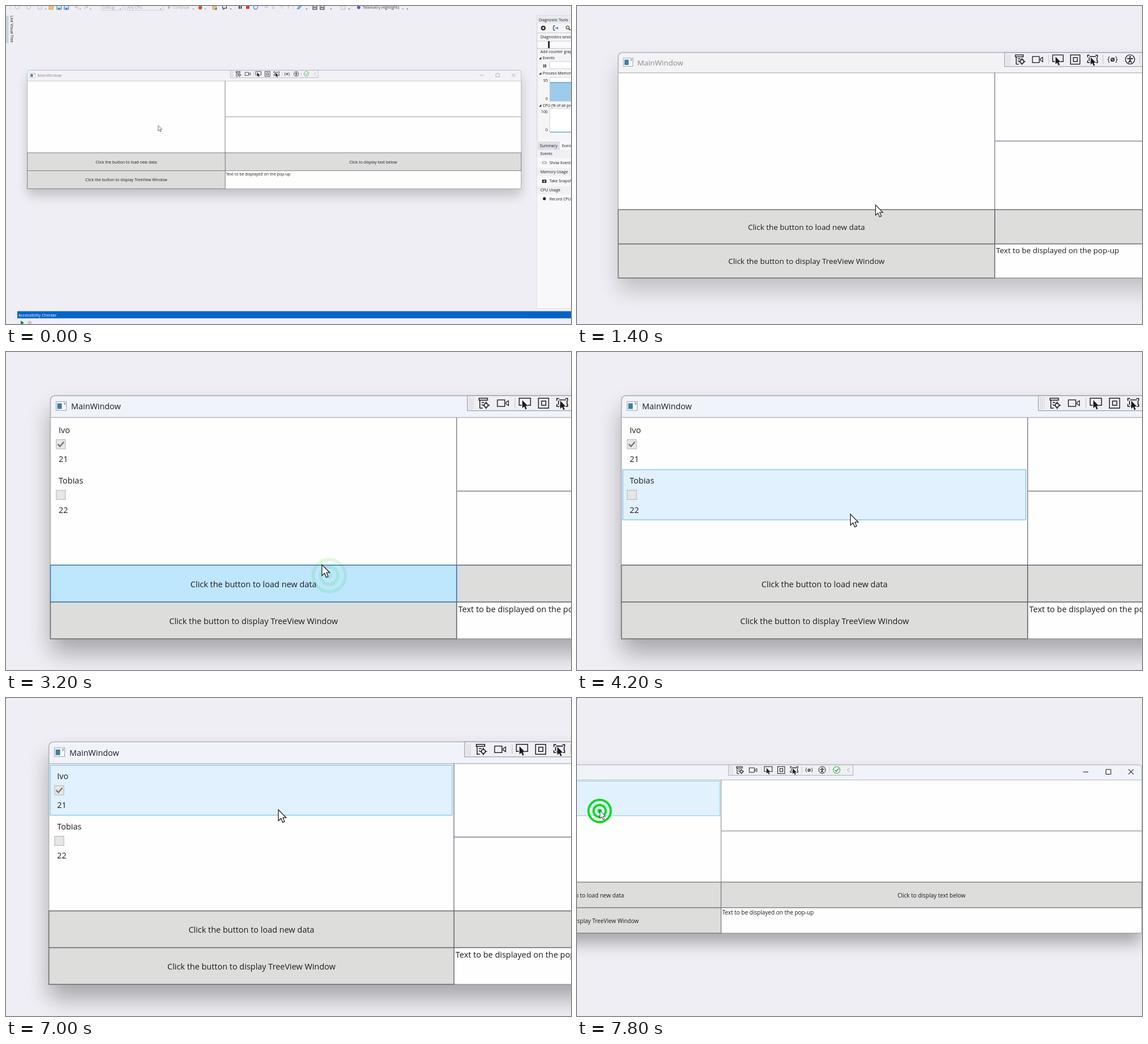
Write an HTML page that moves like this. It is 998 px wide and 561 px high and loops after 8000 ms.

```html
<!DOCTYPE html>
<html lang="en">
<head>
<meta charset="utf-8">
<title>MainWindow demo</title>
<style>
html, body { margin: 0; width: 100%; height: 100%; overflow: hidden; background: #eeeef4; }
svg { display: block; width: 100vw; height: 100vh; font-family: "Open Sans", "Noto Sans", sans-serif; }
text { white-space: pre; }
</style>
</head>
<body>
<svg id="stage" viewBox="0 0 998 561"></svg>
<script>
const LOOP = 8000, STEP = 200, WIDE = 0.4868;
const INK = '#1c1c1e', EDGE = '#707074';

// --- markup helpers ---
const rect = (x, y, w, h, fill = 'none', stroke = 'none', sw = 1, more = '') =>
  `<rect x="${x}" y="${y}" width="${w}" height="${h}" fill="${fill}" stroke="${stroke}" stroke-width="${sw}" ${more}/>`;
const path = (d, stroke = INK, sw = 1.3, fill = 'none', more = '') =>
  `<path d="${d}" stroke="${stroke}" stroke-width="${sw}" fill="${fill}" ${more}/>`;
const disc = (x, y, r, fill = 'none', stroke = 'none', sw = 1) =>
  `<circle cx="${x}" cy="${y}" r="${r}" fill="${fill}" stroke="${stroke}" stroke-width="${sw}"/>`;
const text = (x, y, str, size = 14.5, fill = INK, more = '') =>
  `<text x="${x}" y="${y}" font-size="${size}" fill="${fill}" ${more}>${str}</text>`;
const mid = 'text-anchor="middle"';

// --- development environment around the window, in wide-view pixels ---
function topBar() {
  const gray = '#b9b9c0', blue = '#3f7fbf', gold = '#c99a3a';
  const label = (x, s, c = '#a4a4ac') => text(x, 5.2, s, 6.8, c);
  const drop = x => path(`M${x - 1.5} 4.5h3l-1.5 2z`, 'none', 0, '#55555c');
  let s = '';
  for (const x of [8, 405, 507, 611]) s += path(`M${x} 0v7`, '#b5b5bd', 1, 'none', 'stroke-dasharray="1 1.5"');
  for (const x of [20, 40]) s += disc(x, 2, 3.5, 'none', gray);
  s += rect(57, -2, 6, 8, 'none', gray) + path('M76 0h3l1 1h4l-1 5h-7z', gold, 1, '#e8c987');
  for (const x of [90, 103]) s += rect(x, -1, 7.5, 7, '#dce8f4', blue, 1.2) + rect(x + 2, 3, 3.5, 3, blue);
  s += path('M122 2h5q3 1 0 4M124 0l-2 2l2 2M145 2h-5q-3 1 0 4M143 0l2 2l-2 2', gray, 1);
  for (const x of [70, 131, 149, 202, 273, 331, 352, 701]) s += drop(x).replace('#55555c', '#8f8f98');
  s += rect(168, -4, 39, 11.5, 'none', '#cfcfd6') + label(171, 'Debug');
  s += rect(211, -4, 67, 11.5, 'none', '#cfcfd6') + label(214, 'Any CPU');
  s += path('M286 -1v7l5-3.5z', 'none', 0, gray) + label(295, 'Continue');
  s += disc(343, 3, 3.4, '#d65a4b') + path('M346 0l-3 4', '#555', 1);
  s += path('M365 0h3l1 1h3v5h-7z', gold, 1, '#e8c987') + disc(371, 5, 1.8, blue);
  s += rect(382.5, -1, 7, 5, 'none', INK) + path('M383 6.5l3-2', blue, 1.5);
  for (const x of [397, 531, 574, 606, 709]) s += drop(x);
  s += rect(411, -1, 1.8, 6, INK) + rect(414.5, -1, 1.8, 6, INK) + rect(424, -1, 6, 6, '#d83b2e');
  s += disc(441, 2, 3.6, 'none', blue, 1.2);
  s += path('M456 2h6l-2-2m2 2l-2 2M472 -1v6l-2-2m2 2l2-2M484 0q4 0 4 5M499 5v-6l-2 2m2-2l2 2', gray, 1);
  s += path('M514 5l4-5h4l-4 5z', blue, 1, '#9dc0e4');
  for (const x of [542, 555]) s += rect(x, -1, 7, 7, 'none', INK, 1) + path(`M${x + 2} 4v-3l3 3v-3`, INK, 0.8);
  s += rect(592, 0, 7, 6, 'none', gray);
  return s + disc(623, 2.5, 3, '#7d4fb3') + label(630, 'Telemetry Highlights', '#3b3b42');
}

function sidePanel() {
  const line = '#d0d0d8', t = (x, y, s) => text(x, y, s, 6.9);
  const head = (y, s) => path(`M945.5 ${y}v-4l-4 4z`, 'none', 0, INK) + t(948, y + .5, s);
  let s = rect(938, 17, 300, 516, '#f5f5f8', '#ccccd6') + rect(938, 17, 300, 14, '#e9e9f0');
  s += t(941, 26.7, 'Diagnostic Tools');
  s += disc(949, 39, 2.6, 'none', INK, 1.6) + disc(949, 39, 4, 'none', INK, .8);
  s += path('M970 35h-3v8h3', INK, 1) + path('M969 39h6l-2-2m2 2l-2 2', '#2f6fb5', 1.1);
  s += disc(992, 38, 2.8, 'none', INK, 1) + path('M994 40l3 3', INK, 1.2);
  s += path('M938 47.5h300M938 75.5h300', line) + t(944, 57.2, 'Diagnostics session');
  s += rect(938, 62, 300, 13, '#fafafc', line) + rect(957.5, 62, 2.8, 12.5, INK);
  s += t(944, 83.3, 'Add counter graph');
  s += head(94, 'Events') + rect(949.5, 103, 1.5, 5.5, INK) + rect(952.5, 103, 1.5, 5.5, INK);
  s += rect(960.5, 98, 200, 12.5, '#fff', line);
  s += head(121, 'Process Memory') + rect(960.5, 126, 200, 42, '#fff', line) + rect(961, 135, 200, 33, '#9dcbe9');
  s += path('M961 135h200', '#4d9ccb') + t(949, 134, '95') + t(953, 166.5, '0');
  s += head(177.5, 'CPU (% of all processors)') + rect(960.5, 181, 200, 42, '#fff', line);
  s += path('M961 222.5h200', '#5aa5d2') + t(945, 189, '100') + t(953, 221.5, '0');
  s += rect(938, 238, 300, 295, '#f8f8fa') + rect(939, 239, 39, 15, '#dedee6');
  s += t(943, 249.4, 'Summary') + t(982, 249.4, 'Events');
  for (const [y, name] of [[254, 'Events'], [286, 'Memory Usage'], [318, 'CPU Usage']])
    s += rect(938, y, 300, 14, '#efeff4') + t(944, y + 9.5, name);
  s += rect(947.5, 275, 7, 3, 'none', '#777', .8) + t(960, 279.5, 'Show Events');
  s += rect(947, 306.5, 7.5, 5.5, INK) + disc(950.7, 309.2, 1.5, '#ddd') + t(960, 311.5, 'Take Snapshot');
  return s + disc(951, 340, 2.6, INK) + t(960, 343, 'Record CPU');
}

const environment = () => topBar() + sidePanel()
  + rect(0, 17, 4.5, 48.5, '#cbd2df')
  + text(0, 0, 'Live Visual Tree', 6.7, INK, 'transform="translate(7.8 17) rotate(90)"')
  + rect(20, 538.5, 1000, 12.5, '#0064c8') + text(22, 547.6, 'Accessibility Checker', 7.05, '#fff')
  + path('M26 555v8l6-4z', 'none', 0, '#1f8a2f') + rect(39, 556, 6, 6, '#c6c6cc');

// --- application window, in close-up pixels ---
const arrow = 'M0 0V19.5L4.6 15.4L7.7 22.6L11 21.2L8 14.2H13.8Z';

function toolStrip() {
  let s = rect(815, 77, 318, 26.5, '#f0f0f4', '#a2a2ac', 1.3);
  for (let i = 0; i < 3; i++)
    s += path(`M${819 + i * 3} ${i % 2 ? 82 : 80.5}v20`, '#a9a9b2', 1.2, 'none', 'stroke-dasharray="1.2 1.8"');
  for (const x of [899, 1002.5, 1072.5]) s += path(`M${x} 81v18`, '#c6c6cf', 1.2);
  s += rect(835.5, 81.5, 15, 3.5, 'none', INK, 1.5) + path('M837 85v14h5M840 89h5M840 93h2', INK, 1.5);
  s += disc(848, 94, 3.6, 'none', INK, 1.6) + path('M848 87.5v4M848 96.5v4M841.5 94h4M850.5 94h4', INK, 1.6);
  s += rect(868, 84.5, 13, 11.5, 'none', INK, 1.4) + path('M883 89l4.5-3v8.500l-4.500-3z', INK, 1.3);
  const pointer = (x, y) => path(arrow, 'none', 0, INK, `transform="translate(${x} ${y}) scale(.72)"`);
  s += path('M911 94h-4.500v-12.500h20v12.500h-5', INK, 1.5) + pointer(912, 85);
  s += rect(940.500, 81.5, 18, 17.500, 'none', INK, 1.5) + rect(946, 86.500, 7.500, 7.500, 'none', INK, 1.5);
  s += path('M977 84.500h12M976 86v7M991 86v7M978 95h3M973 86v-4h4M988 82h4v4M973 92v4h4M992 92v4h-3', INK, 1.6) + pointer(979, 86);
  s += text(1020.7, 94.500, '{   }', 13, INK, mid) + disc(1020.7, 90.5, 3, 'none', INK, 1.6) + path('M1018 93.500l6-6.500', INK, 1.3);
  s += disc(1054, 90, 8.800, 'none', INK, 1.4) + disc(1054, 85.500, 1.6, INK);
  s += path('M1048.500 88.500h11M1054 88v4M1054 91.500l-3 5M1054 91.500l3 5', INK, 1.7);
  s += disc(1091, 90, 8.500, '#f2faf2', '#399a4b', 1.5) + path('M1086.500 90l3.500 3.500l6-7', '#2f8f41', 2);
  return s + path('M1124 85l-5.500 5l5.500 5', '#a3a3ac', 1.4);
}

const button = (id, x, y, w, label) =>
  rect(x, y, w, 65, '#dddddc', EDGE, 1.6, `id="${id}"`) + text(x + w / 2, y + 38.6, label, 14.5, INK, mid);

const person = (y, name, age, on) => text(93, y + 24.5, name) + text(93, y + 76, age)
  + rect(88.7, y + 36.5, 16.3, 16.3, '#e6e6e6', '#bdbdbd', 1.2)
  + (on ? path(`M91.500 ${y + 44.500}l3.800 4l7-8`, '#6f6f6f', 2.2) : '');

const hoverRow = (id, y) => rect(80.8, y, 712, 88.5, '#e1f1fd', '#7cc3e8', 1.3, `id="${id}"`);

function appWindow() {
  const [L, D, R] = [78.5, 796, 1870];
  let s = rect(L, 101, R - L, 430, '#000', 'none', 0, 'id="shadow" rx="10" filter="url(#soft)"');
  s += rect(L, 77, R - L, 429, '#f3f3f6', '#a9a9af', 1.4, 'id="frame" rx="8"');
  s += rect(88.5, 87.500, 18, 15.500, '#fdfdfd', '#a5a9b0', 1.2) + rect(90.500, 90.500, 8, 10, '#3d7f9e') + rect(102, 89.500, 3, 3, '#8fa3b5');
  s += text(115, 101.3, 'MainWindow', 14.4, INK, 'id="title"');
  s += `<g id="controls" fill="none" stroke-width="1.5"><path d="M1720 95h13.5M1836 88l13 13M1849 88l-13 13"/><rect x="1778.500" y="88.500" width="12.500" height="12.500" rx="1"/></g>`;
  s += rect(L, 115.5, D - L, 260.5, '#fefefe', '#abadb3', 1.3);
  s += rect(D, 115.5, R - D, 130, '#fefefe', '#abadb3', 1.3) + rect(D, 245.5, R - D, 130.5, '#fefefe', '#abadb3', 1.3);
  s += path(`M${D} 115.500V376M${D} 245.500H${R}`, '#a0a0aa', 2);
  s += `<g id="list">${hoverRow('row1', 118.2)}${hoverRow('row2', 207.6)}${person(118, 'Ivo', '21', true)}${person(207.5, 'Tobias', '22', false)}</g>`;
  s += rect(D, 441, R - D, 65, '#fefefe', '#8f8f96', 1.3) + text(798.8, 458.6, 'Text to be displayed on the pop-up');
  s += button('show', D, 376, R - D, 'Click to display text below');
  s += button('tree', L, 441, D - L, 'Click the button to display TreeView Window');
  s += button('load', L, 376, D - L, 'Click the button to load new data');
  return s + toolStrip();
}

const stage = document.getElementById('stage');
stage.innerHTML = `<defs><filter id="soft" x="-10%" y="-30%" width="120%" height="160%"><feGaussianBlur stdDeviation="20"/></filter></defs>
  <g id="camera">
    <g transform="scale(${1 / WIDE}) translate(.4 -76)">${environment()}</g>
    ${appWindow()}
    <g id="ring">${disc(0, 0, 28.5, 'none', '#00d91c', 5.5)}${disc(0, 0, 15.5, 'none', '#00d91c', 5.5)}${disc(0, 0, 5.5, '#00d91c')}</g>
    ${path(arrow, '#222', 1.3, '#fff', 'id="cursor"')}
  </g>${rect(0, 0, 1, 1, '#222', 'none', 0, 'id="speck"')}`;
const el = {};
stage.querySelectorAll('[id]').forEach(n => el[n.id] = n);

// --- motion ---
const clamp = v => Math.max(0, Math.min(1, v));
const set = (n, attrs) => { for (const k in attrs) n.setAttribute(k, attrs[k]); };
const show = (n, on) => set(n, { visibility: on ? 'visible' : 'hidden' });

// time, x, y of the pointer tip
const track = [[0, 553, 277], [700, 552, 276], [1400, 569, 367], [1800, 571, 394], [2800, 571, 394],
  [3200, 558, 375], [3600, 506, 296.5], [3800, 494, 291], [4200, 483, 286], [4800, 483, 286],
  [5800, 485, 197], [7000, 485, 197], [7800, 487, 194]];
function pointerAt(t) {
  const i = track.findIndex(p => p[0] >= t);
  if (i < 1) return track[i < 0 ? track.length - 1 : 0].slice(1);
  const [a, b] = [track[i - 1], track[i]], u = (t - a[0]) / (b[0] - a[0]);
  return [1, 2].map(j => a[j] + (b[j] - a[j]) * u);
}

function cameraAt(t) {
  if (t < 4000) {
    const k = WIDE + (1 - WIDE) * clamp((t - 45) / 1580);
    return [k, -0.8 * (1 - k), 148 * (1 - k)];
  }
  const out = Math.max(0, t - 6993) * 0.0003817;
  return [1 - out, -962 * out, 210 * out];
}

const CLICK = 2200, CLICK2 = 7800, FADE = 1150;

function draw(t) {
  const [k, cx, cy] = cameraAt(t), [x, y] = pointerAt(t);
  const active = t >= CLICK, over = y > 374 && x < 796;
  set(el.camera, { transform: `translate(${cx} ${cy}) scale(${k})` });
  set(el.cursor, { transform: `translate(${x} ${y})` });
  set(el.frame, { fill: active ? '#f0f4fa' : '#f3f3f6' });
  set(el.shadow, { opacity: active ? 0.3 : 0.19 });
  set(el.title, { fill: active ? INK : '#8b8b8f' });
  set(el.controls, { stroke: active ? INK : '#96969b' });
  set(el.load, { fill: over ? '#bee6fd' : '#dddddc', stroke: over ? '#3c7fb1' : EDGE });
  set(el.list, { display: active ? 'inline' : 'none' });
  show(el.row1, active && y < 207);
  show(el.row2, active && y >= 207 && y < 296);
  const second = t >= CLICK2, age = t - (second ? CLICK2 : CLICK);
  set(el.ring, {
    transform: second ? 'translate(486 194.500)' : 'translate(571 394.500)',
    opacity: age < 0 ? 0 : clamp(1 - age / FADE)
  });
  show(el.speck, t >= 3800);
}

const start = performance.now();
let last = -1;
function tick() {
  const t = Math.floor(((performance.now() - start) % LOOP) / STEP) * STEP;
  if (t !== last) draw(last = t);
  requestAnimationFrame(tick);
}
tick();
</script>
</body>
</html>
```
